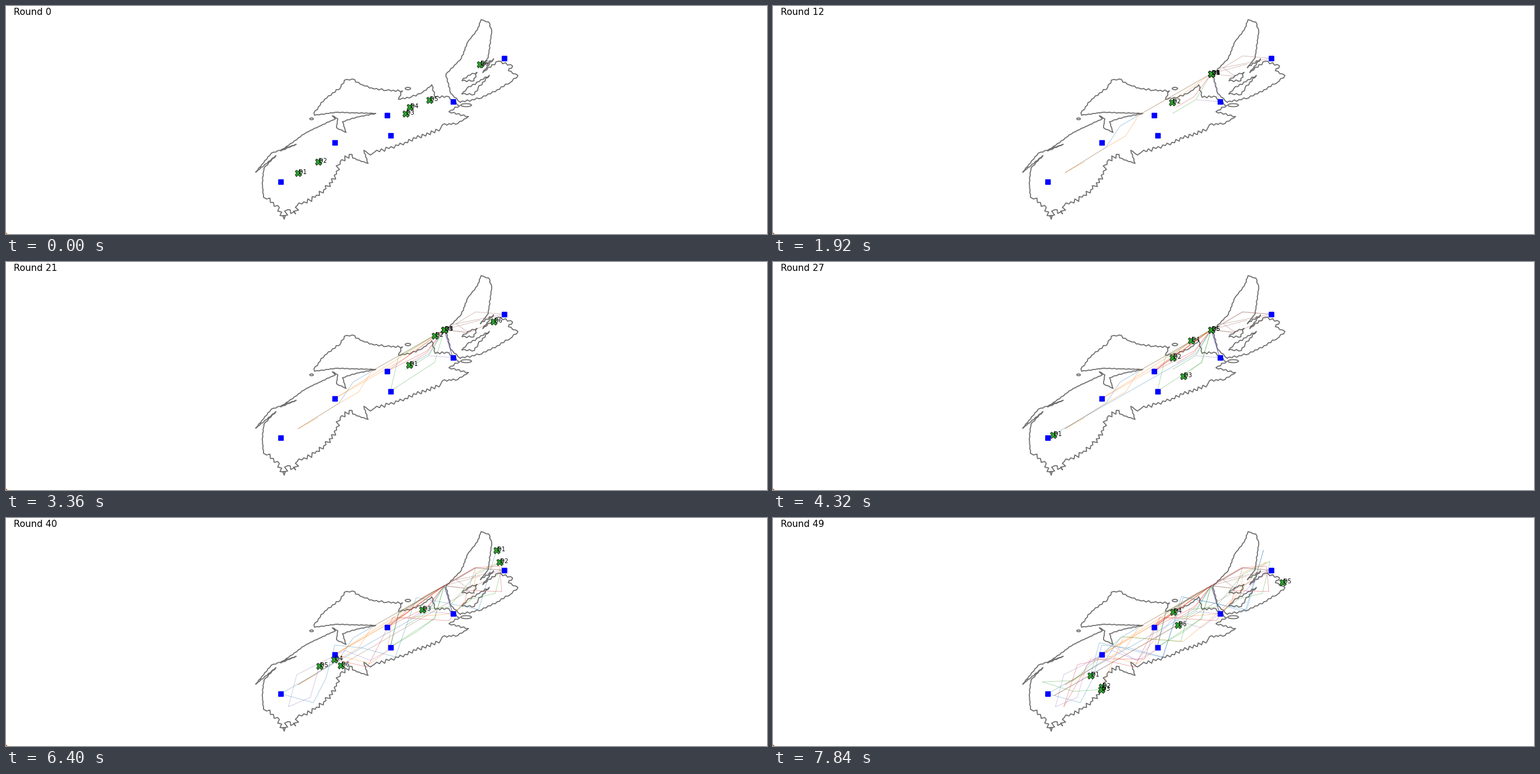
These frames come from a looping animation (1280 by 384 pixels, 8000 ms). A matplotlib script:

```python
import random

import matplotlib.pyplot as plt
import numpy as np
from matplotlib.animation import FuncAnimation
from matplotlib.collections import LineCollection
from matplotlib.patches import Ellipse, Rectangle

W, H, DPI = 1280, 384, 100
ROUNDS, STEP_MS = 50, 160
PT = 72 / DPI  # points per pixel
SPEED = 40  # pixels per round
STOPS = (0, 12, 21, 27, 34, 40, 49)

HUB = (737, 114)
BASES = ISLE, STRAIT, GULF, MID, VALLEY, CAPE = [
    (838, 88), (751.5, 161), (641, 184), (646.5, 217.5), (553, 230), (462, 296)]


def travel(start, via, rounds):
    """One position per round; spare time is spent at the hub or at the end."""
    pts = np.array([start, *via], float)
    far = np.hypot(*np.diff(pts, axis=0).T).cumsum()
    times = [0]
    for t in far / max(SPEED, far[-1] / rounds):
        times.append(max(round(t), times[-1] + 1))
    wait = max(rounds - times[-1], 0) if start == HUB else 0
    now = np.arange(1, rounds + 1) - wait
    return np.column_stack([np.interp(now, times, axis) for axis in pts.T])


def fly(start, *trips):
    route = [np.array([start], float)]
    for via, rounds in zip(trips, np.diff(STOPS)):
        route.append(travel(start, via, rounds))
        start = via[-1]
    return np.concatenate(route)


routes = [
    fly((491, 281),
        [(560, 238), (584, 202), (620, 181), HUB],
        [STRAIT, HUB, (711, 155), (678, 173)],
        [(471, 291)],
        [CAPE, (517, 311), (538, 270), (553, 214), (600, 219), (655, 234)],
        [(690, 134), (740, 143), (795, 154), (825, 54)],
        [(796, 158), (740, 143), (687, 132), (656, 235), (549, 210),
         (534, 265)]),
    fly((525, 262),
        [(491, 281), (560, 238), (593, 219), (615, 184), HUB, (671, 162)],
        [VALLEY, (721, 124)],
        [HUB, (672, 161)],
        [VALLEY, (613, 245), (641, 224)],
        [(650, 170), STRAIT, (787, 128), (790, 92), (830, 74)],
        [(770, 140), (742, 165), (690, 208), (590, 200), (553, 284)]),
    fly((672, 181),
        [(711, 158), HUB],
        [(721, 169), MID, (660, 160), HUB],
        [(721, 169), (690, 192)],
        [MID, (660, 160), HUB, STRAIT, (784, 136)],
        [(823, 127), (836, 73), (790, 95), (745, 150), (700, 154)],
        [(686, 208), (587, 200), (505, 274), (453, 276), (505, 292),
         (552, 289)]),
    fly((679, 170),
        [(708, 153), HUB],
        [GULF, (708, 150), HUB],
        [GULF, (703, 132)],
        [HUB, (787, 84), (830, 81), (834, 124), (776, 122), (772, 140)],
        [(745, 173), (651, 167), (608, 251), (552, 238)],
        [(512, 247), (489, 318), (535, 237), (625, 237), (645, 178),
         (673, 158)]),
    fly((712, 158),
        [STRAIT, HUB],
        [STRAIT, HUB],
        [HUB],
        [(661, 160), (645, 222), (613, 240)],
        [(570, 223), (489, 264), (475, 318), (512, 302), (527, 249)],
        [(570, 215), (612, 240), (672, 170), (720, 185), STRAIT, (830, 90),
         (857, 108)]),
    fly((797, 98),
        [HUB, (778, 119), (757, 104), (790, 84), ISLE, (757, 104), HUB],
        [(778, 119), (820, 100)],
        [ISLE, (790, 84), HUB],
        [(790, 84), (778, 119), (769, 128)],
        [(563, 248)],
        [(473, 299), (681, 180)]),
]


def shore(rng, teeth, *points):
    """Walk along key points in short strides, stepping left and right."""
    out = []
    for a, b in zip(points, points[1:]):
        (x0, y0), (x1, y1) = a, b
        length = np.hypot(x1 - x0, y1 - y0)
        n = max(round(length / 4), 1)
        out.append(a)
        for i in range(1, n):
            side = (-1) ** i * rng.uniform(0.2, 1) * teeth / length
            out.append((x0 + (x1 - x0) * i / n - side * (y1 - y0),
                        y0 + (y1 - y0) * i / n + side * (x1 - x0)))
    return out + [points[-1]]


rng = random.Random(4)
mainland = (
    shore(rng, 1.6, (716, 133), (700, 146), (682, 153), (660, 157), (667, 143),
          (640, 142), (615, 138), (600, 133), (582, 123), (569, 125),
          (563, 137), (536, 157), (518, 180))
    + shore(rng, 0.7, (519, 184), (554, 179), (622, 181), (590, 187),
            (566, 195), (572, 213), (556, 205), (558, 190), (549, 185))
    + shore(rng, 0.7, (554, 190), (505, 213), (462, 244), (488, 233),
            (446, 248), (420, 280), (454, 252), (434, 273), (431, 298),
            (433, 322))
    + shore(rng, 4.5, (438, 325), (457, 336), (468, 359), (474, 343),
            (487, 350), (490, 336), (520, 322), (538, 308), (556, 283),
            (562, 262), (582, 250))
    + shore(rng, 0.8, (583, 256), (609, 265), (602, 243), (613, 251))
    + shore(rng, 3.5, (620, 246), (660, 235), (690, 223), (731, 206))
    + shore(rng, 1.8, (734, 200), (760, 198), (778, 186), (745, 178),
            (763, 168), (741, 152), (722, 154), (716, 133)))
island = (
    shore(rng, 0.8, (764, 162), (748, 147), (740, 115), (766, 88), (777, 60),
          (793, 40), (799, 23), (812, 27), (817, 42), (811, 87))
    + shore(rng, 1.8, (798, 104), (820, 89), (802, 112), (828, 93), (852, 101),
            (845, 109), (861, 117), (848, 129), (826, 141), (800, 155),
            (764, 162)))
inlet = shore(rng, 1.5, (792, 112), (777, 117), (767, 126), (787, 126),
              (792, 112))
lake = shore(rng, 1.5, (767, 148), (775, 139), (813, 117), (794, 138),
             (788, 149), (767, 148))

fig = plt.figure(figsize=(W / DPI, H / DPI), dpi=DPI, facecolor="white")
ax = fig.add_axes([0, 0, 1, 1])
ax.set_xlim(0, W)
ax.set_ylim(H, 0)
ax.axis("off")
plt.rcParams["font.family"] = "DejaVu Sans"

coast = dict(color="#707070", lw=1.75 * PT)
for outline in (mainland, island, inlet, lake):
    ax.plot(*np.array(outline).T, solid_joinstyle="round", zorder=1, **coast)
for x, y, w, h in [(676, 139, 9, 4), (514, 190, 6, 3), (774, 167, 18, 5)]:
    ax.add_patch(Ellipse((x, y), w, h, fill=False, zorder=1, **coast))

ax.plot(*np.array(BASES).T, "s", color="blue", ms=6, mew=1, zorder=5)

trails, labels = [], []
for i in range(len(routes)):
    trail = LineCollection([], colors=f"C{i}", alpha=0.5, linewidths=0.7 * PT,
                           zorder=2)
    trails.append(ax.add_collection(trail, autolim=False))
    labels.append(ax.text(0, 0, f"D{i + 1}", fontsize=7, zorder=6))
drones, = ax.plot([], [], "X", mfc="#2ca02c", mec="black", ms=11 * PT,
                  mew=0.7 * PT, zorder=4)
corner = ax.add_patch(Rectangle((0, 382), 2, 2, lw=0, zorder=3))
title = ax.text(12.8, 15.4, "", fontsize=11.1)


def draw(n):
    title.set_text(f"Round {n}")
    here = np.array([route[n] for route in routes])
    drones.set_data(*here.T)
    for route, trail, label, (x, y) in zip(routes, trails, labels, here):
        legs = zip(route[:n], route[1:n + 1])
        trail.set_segments([leg for leg in legs if not np.allclose(*leg)])
        label.set_position((x + 1, y + 1.6))
    k = min(n / 12, 1)
    corner.set_facecolor((1 - 0.18 * k, 0.5 - 0.1 * k, 0.06 + 0.1 * k))
    return [title, drones, corner, *trails, *labels]


anim = FuncAnimation(fig, draw, frames=ROUNDS, interval=STEP_MS,
                     repeat=True, repeat_delay=0, blit=False)
plt.show()
```
